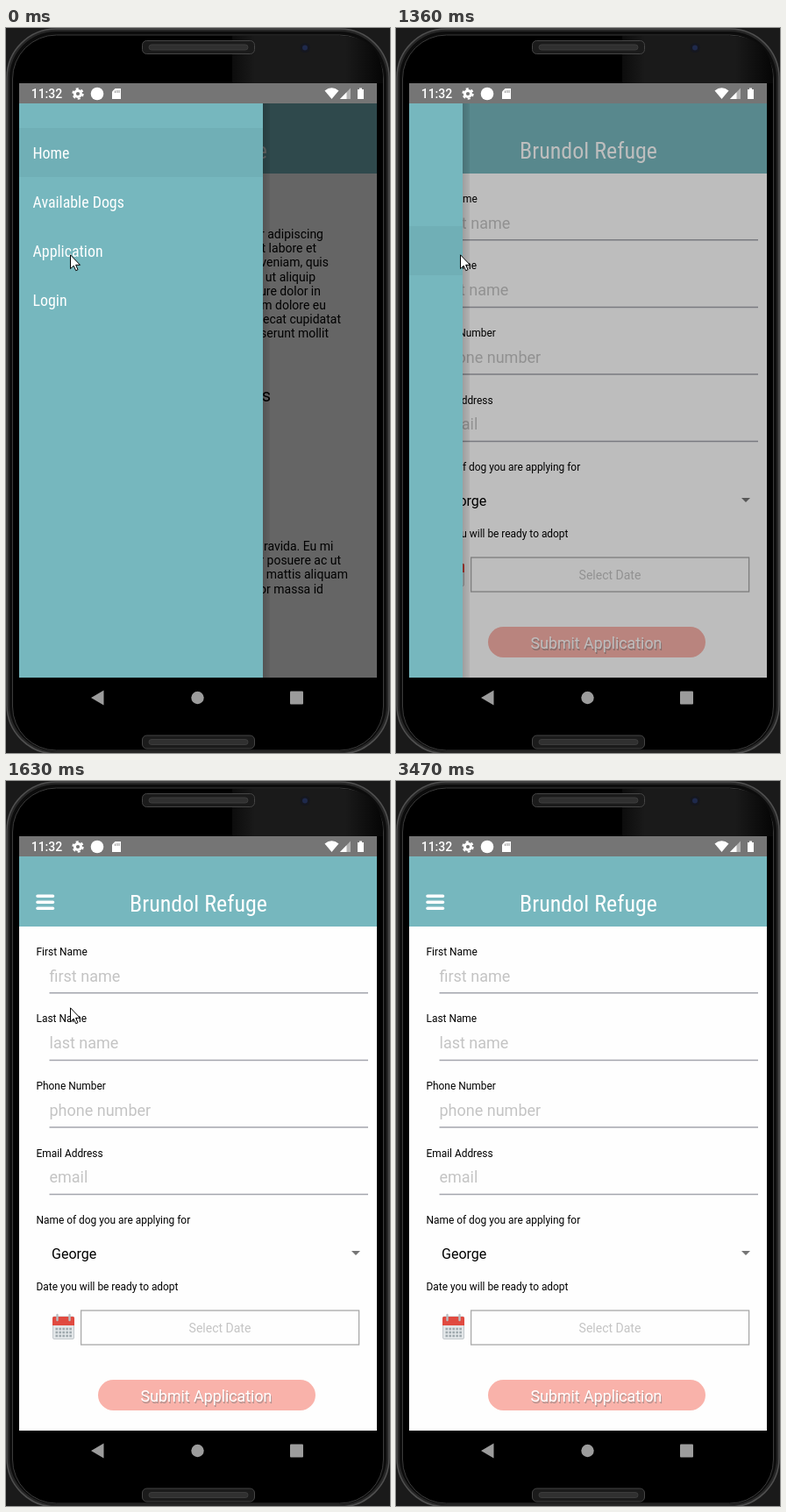
These frames come from a looping animation (438x827 px, 5310 ms). An HTML page:

```html
<!DOCTYPE html>
<html lang="en">
<head>
<meta charset="utf-8">
<title>Dog adoption app</title>
<style>
html, body { margin: 0; width: 100%; height: 100%; overflow: hidden; background: #000; }
svg { display: block; width: 438px; height: 827px; font-family: Roboto, sans-serif; }
.cond { font-family: "Roboto Condensed", Roboto, sans-serif; font-stretch: 75%; fill: #fff; }
.menu { font-size: 17.9px; }
.title { font-size: 26px; text-anchor: middle; }
.label { font-size: 11.92px; }
.hint { font-size: 18px; fill: #c4c4c4; }
.lorem { font-size: 14px; text-anchor: end; }
.anim { animation: 5310ms step-end infinite; }

#home { animation-name: home; }
#form { animation-name: form; }
#dim { animation-name: dim; }
#drawer { animation-name: drawer; }
#active { animation-name: active; }
#ripple { animation-name: ripple; }
#wave { animation-name: wave; }
#cursor { animation-name: cursor; }

@keyframes home { 0% { visibility: visible } 22.787%, 100% { visibility: hidden } }
@keyframes form { 0% { visibility: hidden } 22.787%, 100% { visibility: visible } }
@keyframes dim {
  0% { opacity: .6 }
  25.612% { opacity: .26 }
  27.871% { opacity: .09 }
  30.696%, 100% { opacity: 0 }
}
@keyframes drawer {
  0% { transform: none }
  25.612% { transform: translateX(-217px) }
  27.871% { transform: translateX(-266px) }
  30.696%, 100% { transform: translateX(-310px) }
}
@keyframes active { 0% { transform: none } 25.612%, 100% { transform: translateY(112px) } }
@keyframes ripple {
  0% { opacity: 0 }
  18.267% { opacity: .26 }
  22.787% { opacity: .2 }
  25.612%, 100% { opacity: 0 }
}
@keyframes wave { 0% { r: 101px } 20.527%, 100% { r: 300px } }
@keyframes cursor {
  0% { transform: translate(73px, 258px) }
  48.775% { transform: translate(259px, 531px) }
  51.035% { transform: translate(317px, 781px) }
  58.568% { transform: translate(312px, 790px) }
  60.828% { transform: translate(302px, 803px) }
  63.088% { transform: translate(292px, 816px) }
  65.348%, 100% { transform: translate(280px, 840px) }
}
</style>
</head>
<body>
<svg viewBox="0 0 438 827">
  <defs>
    <clipPath id="screen"><rect x="15" y="86" width="408" height="655"/></clipPath>
    <clipPath id="row"><rect x="15" y="226" width="278" height="56"/></clipPath>
    <linearGradient id="shade"><stop stop-opacity=".16"/><stop offset="1" stop-opacity=".05"/></linearGradient>
    <linearGradient id="glare">
      <stop stop-color="#0c0c0c"/><stop offset=".15" stop-color="#1a1a1a"/>
      <stop offset=".75" stop-color="#1a1a1a"/><stop offset="1" stop-color="#050505"/>
    </linearGradient>
    <g id="speaker">
      <rect x="155.5" y=".5" width="128" height="15" rx="5" fill="#1b1b1b" stroke="#454545"/>
      <rect x="163" y="5" width="113" height="6" rx="3" fill="#303030" stroke="#3c3c3c"/>
    </g>
    <path id="line" d="M49.5 0H413" stroke="#a3a5ad" stroke-width="1.4"/>
  </defs>

  <!-- phone body -->
  <rect width="438" height="827" fill="#1a1a1a"/>
  <rect x="1" y="1" width="436" height="827" rx="56" fill="#262626" stroke="#505050" stroke-width="1.5"/>
  <rect x="4" y="4" width="430" height="821" rx="53" fill="#0c0c0c"/>
  <rect x="7.500" y="8" width="423" height="816" rx="50" fill="#000" stroke="#3b3b3b"/>
  <path d="M258 9H382Q430 10 430 60V63H258Z" fill="url(#glare)"/>
  <use href="#speaker" y="14"/>
  <use href="#speaker" y="806.500"/>
  <circle cx="341" cy="22.500" r="5.500" fill="#15171f"/>
  <circle cx="341" cy="22.500" r="3" fill="#1f2a4c"/>

  <!-- status bar -->
  <rect x="15" y="63" width="408" height="23" fill="#757575"/>
  <g fill="#fff">
    <text x="28.700" y="80" font-size="14" font-weight="500">11:32</text>
    <circle cx="82" cy="75" r="3.600" fill="none" stroke="#fff" stroke-width="3"/>
    <circle cx="82" cy="75" r="5.700" fill="none" stroke="#fff" stroke-width="2" stroke-dasharray="3 2.970"/>
    <circle cx="104" cy="75" r="7.300"/>
    <path d="M124.500 69H131V81H121V72.500Z"/>
    <path d="M124.500 71.500V74M126.800 71V74M129 71V74" stroke="#757575" stroke-width=".8"/>
    <path d="M363.500 71.500Q371.500 65 379.500 71.500L371.500 81Z"/>
    <path d="M393 68.500V81H381Z" opacity=".45"/>
    <path d="M388.500 73.200V81H381Z"/>
    <path d="M403 68.500H406V70H408V81H401V70H403Z"/>
  </g>

  <g clip-path="url(#screen)">
    <rect x="15" y="86" width="408" height="655" fill="#fefefe"/>

    <g id="home" class="anim">
      <g class="lorem">
        <text x="362" y="240">dolor sit amet, consectetur adipiscing</text>
        <text x="354" y="256.200">eiusmod tempor incididunt ut labore et</text>
        <text x="368" y="272.400">Ut enim ad minim veniam, quis</text>
        <text x="353" y="288.600">ullamco laboris nisi ut aliquip</text>
        <text x="359" y="304.800">Duis aute irure dolor in</text>
        <text x="365" y="321">velit esse cillum dolore eu</text>
        <text x="382" y="337.200">sint occaecat cupidatat</text>
        <text x="368" y="353.400">culpa qui officia deserunt mollit</text>
        <text x="373.500" y="596">neque gravida. Eu mi</text>
        <text x="382" y="612.200">tortor posuere ac ut</text>
        <text x="390" y="628.400">lectus mattis aliquam</text>
        <text x="362" y="644.600">tempor massa id</text>
      </g>
      <text x="302" y="426" font-size="20" text-anchor="end">Our Dogs</text>
    </g>

    <g id="form" class="anim">
      <g class="label">
        <text x="34.500" y="198.500">First Name</text>
        <text x="34.500" y="275">Last Name</text>
        <text x="34.500" y="351.500">Phone Number</text>
        <text x="34.500" y="428.500">Email Address</text>
        <text x="34.500" y="504.800">Name of dog you are applying for</text>
        <text x="34.500" y="580.500">Date you will be ready to adopt</text>
      </g>
      <g class="hint">
        <text x="49.500" y="228.500">first name</text>
        <text x="49.500" y="305">last name</text>
        <text x="49.500" y="381.500">phone number</text>
        <text x="49.500" y="458.300">email</text>
      </g>
      <use href="#line" y="241.800"/>
      <use href="#line" y="318.500"/>
      <use href="#line" y="395"/>
      <use href="#line" y="471.500"/>
      <text x="52" y="545.300" font-size="16">George</text>
      <path d="M394 536H404L399 541Z" fill="#757575"/>

      <!-- calendar -->
      <rect x="53.500" y="611" width="24" height="25.500" rx="1.500" fill="#e3e7e9" stroke="#c3c9cc"/>
      <path d="M53 621V612.500Q53 611 54.500 611H76.500Q78 611 78 612.500V621Z" fill="#e04a40"/>
      <path d="M58.500 609V615M72.500 609V615" stroke="#b9bec1" stroke-width="2.400" stroke-linecap="round"/>
      <path d="M56.500 625H75M56.500 629H75M56.500 633H75" stroke="#9fa9ae" stroke-width="2.600" stroke-dasharray="2.600 1.350"/>

      <rect x="85.600" y="604" width="317" height="39" fill="none" stroke="#a9a9a9" stroke-width="1.300"/>
      <text x="244" y="629" font-size="14" fill="#c4c4c4" text-anchor="middle">Select Date</text>
      <rect x="105" y="683" width="248" height="35" rx="17.500" fill="#f9b2aa"/>
      <g font-size="17.800" text-anchor="middle">
        <text x="229.500" y="709.500" fill="#a08a88" opacity=".75">Submit Application</text>
        <text x="228.500" y="708" fill="#fff">Submit Application</text>
      </g>
    </g>

    <rect x="15" y="86" width="408" height="80" fill="#76b7be"/>
    <path d="M36 131.300H53.500M36 138.300H53.500M36 145.300H53.500" stroke="#fff" stroke-width="3.600" stroke-linecap="round"/>
    <text class="cond title" x="219.500" y="148.500">Brundol Refuge</text>

    <rect id="dim" class="anim" x="15" y="86" width="408" height="655"/>

    <g id="drawer" class="anim">
      <rect x="293" y="86" width="8" height="655" fill="url(#shade)"/>
      <rect x="15" y="86" width="278" height="655" fill="#76b7be"/>
      <rect id="active" class="anim" x="15" y="114" width="278" height="56" fill="#70afb6"/>
      <g id="ripple" class="anim" clip-path="url(#row)"><circle id="wave" class="anim" cx="114.500" cy="264" r="101"/></g>
      <g class="cond menu">
        <text x="30.500" y="149">Home</text>
        <text x="30.500" y="205">Available Dogs</text>
        <text x="30.500" y="261">Application</text>
        <text x="30.500" y="317">Login</text>
      </g>
    </g>
  </g>

  <!-- navigation bar -->
  <g fill="#9c9c9c">
    <path d="M97 764L111.500 755.500V772.500Z"/>
    <circle cx="218.500" cy="764" r="7.200"/>
    <rect x="324" y="756.500" width="15" height="15" rx="1"/>
  </g>

  <path id="cursor" class="anim" d="M.5 .8V16.600L4.200 13.200 6.700 18.700 9 17.700 6.600 12.300H11.500Z" fill="#fff" stroke="#000"/>
</svg>
</body>
</html>
```
